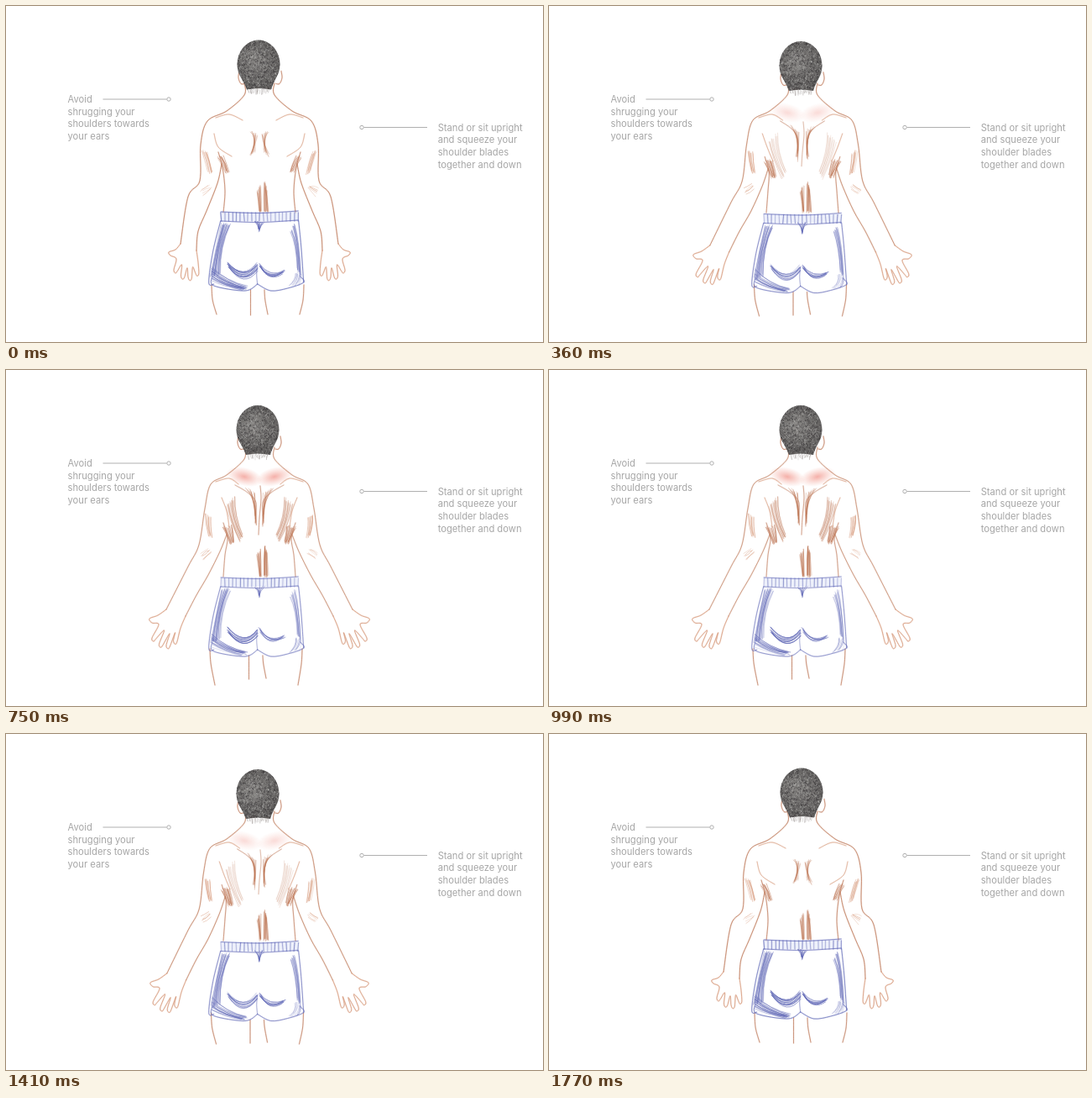
An HTML page with a canvas that plays this animation: 640 px wide and 400 px high, repeating every 1.8 s.

```html
<!DOCTYPE html>
<html lang="en">
<head>
<meta charset="utf-8">
<title>Shoulder blade squeeze</title>
<style>
html, body { margin: 0; width: 100%; height: 100%; overflow: hidden; background: #fff; }
canvas, svg { position: absolute; left: 0; top: 0; width: 640px; height: 400px; }
text { font: 11.2px Inter, "Liberation Sans", sans-serif; fill: #a6a6a6; }
.lead { fill: none; stroke: #b0b0b0; }
</style>
</head>
<body>
<canvas id="stage" width="640" height="400"></canvas>
<svg viewBox="0 0 640 400">
  <text y="115"><tspan x="73.5">Avoid</tspan><tspan x="73.5" dy="14.7">shrugging your</tspan><tspan x="73.5" dy="14.7">shoulders towards</tspan><tspan x="73.5" dy="14.7">your ears</tspan></text>
  <text y="148.7"><tspan x="514.7">Stand or sit upright</tspan><tspan x="514.7" dy="14.7">and squeeze your</tspan><tspan x="514.7" dy="14.7">shoulder blades</tspan><tspan x="514.7" dy="14.7">together and down</tspan></text>
  <path class="lead" d="M115.500 111H191.500M426.500 144.500H502"/>
  <circle class="lead" cx="194" cy="111" r="2.200"/>
  <circle class="lead" cx="424" cy="144.500" r="2.200"/>
</svg>
<script>
const ctx = document.getElementById('stage').getContext('2d');
const SKIN = '186,112,78', PALE = '212,148,116', BLUE = '92,100,180';
const HOLD = 180, MID = 302;
const ORDER = [0, 1, 2, 3, 3, 3, 3, 2, 1, 0];

// reach: arms away from the body, pull: shoulder blades together, drop: shorts offset
const POSES = [
  { reach: 0, pull: 0, red: 0, drop: 0, foot: 367, ink: 1 },
  { reach: 1, pull: .25, red: .2, drop: 1, foot: 374, ink: .82 },
  { reach: .95, pull: .7, red: .25, drop: 2.5, foot: 369, ink: .92 },
  { reach: 1, pull: 1, red: .55, drop: 2, foot: 375, ink: .85 }
];

let seed = 1;
const rnd = () => (seed = (seed * 16807) % 2147483647) / 2147483647;
const jit = (k = 1) => (rnd() - .5) * k;
const mix = (a, b, k) => a + (b - a) * k;
const rgba = (c, a) => `rgba(${c},${a})`;
const parse = s => s.split(' ').map(p => p.split(',').map(Number));

function stroke(color, alpha, width) {
  ctx.strokeStyle = rgba(color, alpha);
  ctx.lineWidth = width;
  ctx.stroke();
}

// Smooth line through a few points
function pencil(line, color = SKIN, alpha = .75) {
  const p = typeof line === 'string' ? parse(line) : line, end = p.length - 1;
  ctx.beginPath();
  ctx.moveTo(...p[0]);
  for (let i = 0; i < end; i++) {
    const [a, b, c, d] = [-1, 0, 1, 2].map(k => p[Math.min(Math.max(i + k, 0), end)]);
    ctx.bezierCurveTo(b[0] + (c[0] - a[0]) / 6, b[1] + (c[1] - a[1]) / 6,
      c[0] - (d[0] - b[0]) / 6, c[1] - (d[1] - b[1]) / 6, ...c);
  }
  stroke(color, alpha, .9);
  stroke(color, alpha * .25, 1.8);
}

// Loose strokes blending from one three-point curve to another
function shade(from, to, n, color = SKIN, alpha = .4) {
  const a = parse(from), b = parse(to);
  for (let i = 0; i < n; i++) {
    const k = (i + rnd() * .6) / n;
    const q = a.map((p, j) => [mix(p[0], b[j][0], k) + jit(1.5), mix(p[1], b[j][1], k) + jit(4)]);
    ctx.beginPath();
    ctx.moveTo(...q[0]);
    ctx.quadraticCurveTo(...q[1], ...q[2]);
    stroke(color, alpha * mix(.5, 1.2, rnd()), .9);
  }
}

function both(draw) {
  draw();
  ctx.save();
  ctx.translate(2 * MID, 0);
  ctx.scale(-1, 1);
  draw();
  ctx.restore();
}

function blush(alpha) {
  ctx.save();
  ctx.translate(284, 127);
  ctx.rotate(.25);
  ctx.scale(22, 11);
  const g = ctx.createRadialGradient(0, 0, 0, 0, 0, 1);
  g.addColorStop(0, rgba('236,110,98', alpha));
  g.addColorStop(1, rgba('240,140,120', 0));
  ctx.fillStyle = g;
  ctx.fillRect(-1, -1, 2, 2);
  ctx.restore();
}

function head() {
  both(() => pencil('277,78 276,86 279,93 283,93'));
  ctx.save();
  ctx.beginPath();
  ctx.ellipse(300, 70, 25.5, 29, 0, Math.PI, 0);
  ctx.bezierCurveTo(325, 84, 319, 86, 315, 100);
  ctx.quadraticCurveTo(300, 97, 286, 100);
  ctx.bezierCurveTo(281, 86, 275, 84, 274.5, 70);
  const g = ctx.createRadialGradient(294, 64, 4, 300, 70, 32);
  g.addColorStop(0, '#858381');
  g.addColorStop(1, '#5c5a59');
  ctx.fillStyle = g;
  ctx.fill();
  ctx.clip();
  for (let i = 0; i < 1400; i++) {
    const x = 300 + jit(54), y = 71 + jit(64);
    ctx.beginPath();
    ctx.moveTo(x, y);
    ctx.lineTo(x + jit(2), y + jit(3));
    stroke(...(rnd() < .62 ? ['40,39,40', .5] : ['200,198,196', .45]), .8);
  }
  ctx.restore();
  shade('287,98 287,100 288,104', '314,98 314,100 313,104', 16, '110,100,96', .4);
}

// Thumb, then four fingers fanned out between the two sides of the wrist
function hand(wx, wy, ix, iy, reach) {
  const turn = 1 - reach;
  const root = i => [wx - 9 + 4 * turn + 6.5 * i, wy + 18 + 11 * Math.sin(Math.PI * i / 4.6)];
  const line = [[wx, wy], [wx - 10 + 4 * turn, wy + 7], [wx - 20 + 6 * turn, wy + 11 - turn], [wx - 17 + 5 * turn, wy + 16 - 2 * turn], root(0)];
  for (let i = 0; i < 4; i++) {
    const x = wx - 15 + 8.5 * i + 9 * turn, y = wy + 38 + 9 * Math.sin(Math.PI * i / 3.4) - 3 * turn;
    line.push([x - 2, y - 4], [x, y], [x + 2.3, y - 2.5], root(i + 1));
  }
  line.push([ix, iy]);
  pencil(line, PALE, .85);
}

function arm({ reach: r, pull: p, ink }) {
  const wx = 208 - 17 * r, wy = 283 + 2 * r, ix = 227 - 13 * r, iy = 291 + 2 * r;
  const px = 257 + 6 * p, py = 188 + 8 * p;
  pencil(`284,92 284,106 263,125 ${240 + 4 * p},${137 - p} ${232 + 5 * p},165 ${231 - p},208 217,${227 + 7 * r} ${wx},${wy}`, SKIN, .8 * ink);
  pencil(`${px},${py} ${252 + 3 * p},${211 + 5 * p} ${239 + 2 * r},244 ${229 - 2 * r},268 ${ix},${iy}`, SKIN, .8 * ink);
  pencil(`${px - 4},${py - 14} ${px + 1},${py + 4} 261,220 259,246`, SKIN, .75 * ink);
  hand(wx, wy, ix, iy, r);
  shade(`${234 + 4 * p},172 237,182 241,196`, `${240 + 5 * p},176 244,186 246,200`, 8, PALE, .55);
  shade('232,218 236,214 241,213', '236,226 241,223 245,218', 5, PALE, .5);
  // Side of the chest
  shade(`${px - 5},${py - 8} ${px},${py} ${px + 4},${py + 10}`, `${px + 2 + 5 * p},${py - 10} ${px + 8},${py} ${px + 9},${py + 9}`, 10 + 6 * p, SKIN, .5);
}

function blade({ pull: p, red }) {
  if (red) blush(red);
  pencil(`250,133 266,129 ${282 - 5 * p},136`, PALE, .65);
  pencil(`${248 + 9 * p},152 ${253 + 10 * p},168 ${269 - 3 * p},${179 + 8 * p}`, PALE, .65);
  if (p) pencil(`${282 - 9 * p},137 ${291 - 3 * p},146 ${293 + 5 * p},158 ${289 + 8 * p},${172 + 10 * p}`, SKIN, .5);
  shade(`${291 - 5 * p},${149 - 8 * p} 297,152 297,172`, `${300 - 2 * p},${154 - 6 * p} 298,166 ${290 + 8 * p},${178 + 9 * p}`, 11, SKIN, .36);
  shade('273,152 272,174 282,196', '262,162 266,182 278,205', 15 * p, SKIN, .36 * p);
}

function spine({ pull: p }) {
  if (p) pencil(`303,138 304,153 302,${170 + 6 * p} 301,${178 + 18 * p}`, SKIN, .6 * p);
  shade('299,222 301,232 302,245', '304,214 304,228 304,245', 11, SKIN, .45);
  shade('308,210 307,226 307,245', '311,220 312,232 313,245', 13, SKIN, .5);
}

function shorts({ drop, ink }) {
  ctx.save();
  ctx.translate(-.3, drop);
  ctx.fillStyle = rgba('222,227,248', .5);
  ctx.fillRect(256, 245, 93, 11);
  pencil('256,256 247,292 242,329 248,331', BLUE, .75 * ink);
  pencil('246,322 248,333 285,339 300,331', BLUE, .75 * ink);
  pencil('300,331 316,339 336,336 355,329 351,322', BLUE, .75 * ink);
  pencil('349,256 352,286 355,329', BLUE, .75 * ink);
  pencil('300,308 299,320 300,331', BLUE, .5 * ink);
  // Waistband
  for (const y of [245, 256]) pencil(`256.500,${y} 302,${y + 1.5} 348.500,${y - 1}`, BLUE, .7 * ink);
  for (let x = 256.5; x < 350; x += 4.6) pencil(`${x + jit()},246 ${x + jit()},256`, BLUE, mix(.35, .75, rnd()) * ink);
  // Hanging folds
  shade('257,260 250,290 244,322', '268,260 255,285 256,318', 20, BLUE, .5 * ink);
  shade('345,260 350,280 352,320', '339,268 346,285 347,312', 13, BLUE, .4 * ink);
  shade('296,257 301,260 302,267', '309,257 304,260 302,267', 11, BLUE, .6 * ink);
  // Lower left shadow
  shade('246,312 262,328 288,335', '246,327 260,334 280,337', 18, BLUE, .5 * ink);
  // Crescents under the seat
  shade('264,305 284,326 299,307', '266,311 283,336 300,314', 13, BLUE, .7 * ink);
  shade('302,306 314,324 333,315', '304,311 314,329 329,318', 10, BLUE, .65 * ink);
  shade('345,318 346,326 338,333', '353,320 353,328 350,331', 8, BLUE, .4 * ink);
  ctx.restore();
}

function legs({ foot, drop }) {
  const lean = (foot - 367) / 4, y = 338 + drop;
  for (const [x, top, bend, low] of [[245, 332, 6, foot], [291.5, y, 0, 368], [308, y, 4, 367], [355, 332, -5, foot]])
    pencil(`${x - lean},${top} ${x - lean + bend * .2},350 ${x - lean + bend},${low}`);
}

function paint(i) {
  const p = POSES[i];
  seed = 4711 + i * 977;
  ctx.clearRect(0, 0, 640, 400);
  ctx.lineCap = ctx.lineJoin = 'round';
  both(() => { blade(p); arm(p); });
  spine(p);
  legs(p);
  shorts(p);
  ctx.save();
  ctx.translate(i ? 0 : 1, i ? 1 : -.5);
  head();
  ctx.restore();
}

let shown = -1;
function tick() {
  const pose = ORDER[Math.floor(performance.now() / HOLD) % ORDER.length];
  if (pose !== shown) paint(shown = pose);
  requestAnimationFrame(tick);
}
tick();
</script>
</body>
</html>
```
